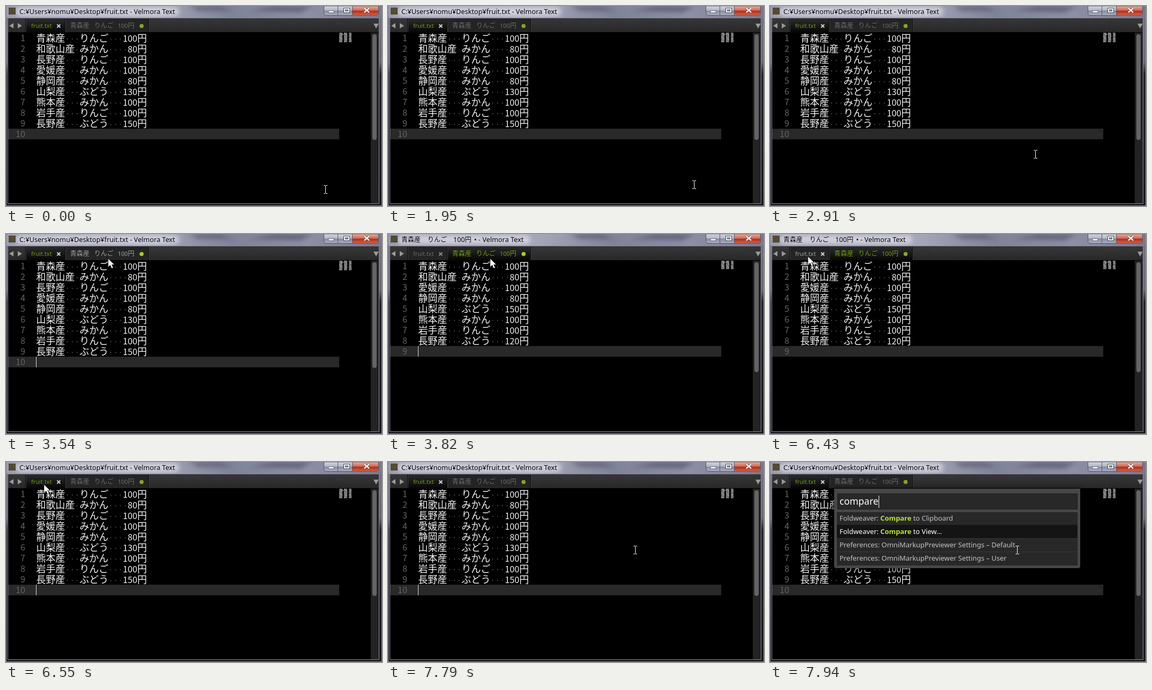
Animation of 703x375 px, one loop 8000 ms. Source, as an HTML page:

```html
<!DOCTYPE html>
<html lang="ja">
<head>
<meta charset="utf-8">
<title>Text editor</title>
<style>
  html, body { margin: 0; width: 100%; height: 100%; overflow: hidden; background: #000; }
  svg { display: block; width: 703px; height: 375px; }
  text { white-space: pre; font-family: "Noto Sans", "Noto Sans CJK JP", sans-serif; }
  .code text { font: 500 16.2px "Noto Sans CJK JP", sans-serif; fill: #f4f4f4; }
  .code .wide { font-size: 18px; }
  .code .space { font: 15px "Noto Sans Mono", monospace; fill: #555; }
  .code .number { font-weight: 400; fill: #646464; text-anchor: end; }
  .title { font-size: 12.7px; fill: #050505; }
  .title .wide { font-size: 12px; }
  .tab { font-size: 11px; fill: #6c6c6c; }
  .tab .wide { font-size: 12px; }
  .tab.hover { fill: #a0a0a0; }
  .tab.active { fill: #6f9f12; }
  .palette text { font-size: 12.9px; fill: #c4c4c4; }
  .palette .query { font-size: 17.5px; fill: #fff; }
  .palette .selected { fill: #fff; }
  .palette .match { font-weight: 700; fill: #b4e438; }
</style>
</head>
<body>
<svg viewBox="0 0 703 375" lang="ja">
  <defs>
    <linearGradient id="glass">
      <stop offset="0" stop-color="#9b9caf"/><stop offset=".4" stop-color="#a5a7b9"/>
      <stop offset=".6" stop-color="#7f849a"/><stop offset=".8" stop-color="#8d90a6"/>
      <stop offset="1" stop-color="#77788f"/>
    </linearGradient>
    <linearGradient id="bar" x2="0" y2="1">
      <stop offset="0" stop-color="#373737"/><stop offset="1" stop-color="#282828"/>
    </linearGradient>
    <linearGradient id="tabOn" x2="0" y2="1">
      <stop offset="0" stop-color="#2b2b2b"/><stop offset="1" stop-color="#050505"/>
    </linearGradient>
    <linearGradient id="button" x2="0" y2="1">
      <stop offset="0" stop-color="#d3d7e1"/><stop offset=".48" stop-color="#b0b5c5"/>
      <stop offset=".5" stop-color="#83889d"/><stop offset="1" stop-color="#adb2c5"/>
    </linearGradient>
    <linearGradient id="close" x2="0" y2="1">
      <stop offset="0" stop-color="#e5aa9d"/><stop offset=".48" stop-color="#cf6a58"/>
      <stop offset=".5" stop-color="#ae2a18"/><stop offset="1" stop-color="#d2654b"/>
    </linearGradient>
    <linearGradient id="side" x2="0" y2="1">
      <stop offset="0" stop-color="#77738a"/><stop offset=".28" stop-color="#6d697c"/>
      <stop offset=".34" stop-color="#25232e"/><stop offset="1" stop-color="#1b1921"/>
    </linearGradient>
    <filter id="soft" x="-30%" y="-100%" width="160%" height="300%"><feGaussianBlur stdDeviation="4"/></filter>
    <clipPath id="titleClip"><path d="M0 0H703V22H0Z"/></clipPath>
  </defs>

  <!-- window frame -->
  <path fill="url(#side)" d="M0 0H703V375H0Z"/>
  <rect x=".5" y=".5" width="702" height="374" fill="none" stroke="#8b8799"/>
  <g clip-path="url(#titleClip)">
    <path fill="url(#glass)" d="M1 0H702V23H1Z"/>
    <g filter="url(#soft)">
      <path fill="#45465c" opacity=".55" d="M340 0H400L425 9H360ZM455 9L500 0H575L550 12Z"/>
      <rect id="glow" x="18" y="2" height="17" rx="8" fill="#e0e0e9" opacity=".75"/>
    </g>
  </g>
  <rect x="3.5" y="22.5" width="694" height="348" fill="#000" stroke="#89839a"/>
  <rect x="5" y="3" width="13" height="13" fill="#544a35"/>

  <g stroke="#565868">
    <path fill="url(#button)" d="M594.5 0V13Q594.5 17.5 599 17.5H647.5V0Z"/>
    <path fill="url(#close)" d="M647.5 0V17.5H692Q696.5 17.5 696.5 13V0Z"/>
    <path d="M620.5 0V17"/>
  </g>
  <path fill="#fff" stroke="#454759" stroke-width=".7" d="M603 9H613V12.5H603Z"/>
  <path fill="none" stroke="#454759" stroke-width="4" d="M633 5.5H641V11H633Z"/>
  <path fill="none" stroke="#fff" stroke-width="2" d="M633 5.5H641V11H633Z"/>
  <path stroke="#5b302a" stroke-width="4" d="M670 4L679 12M679 4L670 12"/>
  <path stroke="#fff" stroke-width="2.4" d="M670 4L679 12M679 4L670 12"/>

  <!-- tab strip -->
  <path fill="url(#bar)" d="M4 23H697V49H4Z"/>
  <path fill="#999" d="M14 32V42L6 37ZM22 32V42L30 37ZM687 33H697L692 42Z"/>
  <path fill="#242424" d="M37 24H266V49H37Z"/>
  <rect id="tabFill" y="24" height="26" fill="url(#tabOn)"/>
  <path stroke="#0a0a0a" d="M36.5 24V49M110.5 24V49M266.5 24V49"/>
  <path stroke="#404040" d="M37.5 24V49M111.5 24V49M267.5 24V49"/>
  <path id="tabClose" stroke-width="2" d="M95.5 34.5L101.5 40.5M101.5 34.5L95.5 40.5"/>
  <circle id="dirty" cx="253.5" cy="37.5" r="3.8"/>
  <text class="tab" x="47" y="41">fruit.txt</text>
  <g class="tab">
    <text class="wide" x="120" y="41">青森産</text><text class="wide" x="165" y="41">りんご</text>
    <text x="209" y="41">100<tspan class="wide">円</tspan></text>
  </g>

  <!-- scrollbar -->
  <path fill="#232323" d="M682 50H697V370H682Z"/>
  <rect id="thumb" x="685" y="53" width="8" rx="4" fill="#646464"/>

  <g class="title">
    <text x="25" y="15">C:¥Users¥nomu¥Desktop¥fruit.txt - Velmora Text</text>
  </g>
  <g class="title">
    <text class="wide" x="25" y="15">青森産</text><text class="wide" x="74" y="15">りんご</text>
    <text x="122" y="15">100<tspan class="wide">円</tspan></text><text x="161" y="15">• - Velmora Text</text>
  </g>

  <g class="code"></g>
  <g class="code"></g>
  <rect id="caret" x="56" width="1" height="20" fill="#ddd"/>

  <g class="palette" id="palette">
    <path fill="#000" opacity=".5" filter="url(#soft)" d="M118 50H582V202H118Z"/>
    <path fill="#474747" d="M120 50H580V195Q580 199 576 199H124Q120 199 120 195Z"/>
    <rect x="126.5" y="59.5" width="448" height="29" fill="#282828" stroke="#1b1b1b"/>
    <text class="query" x="130" y="80">compare</text>
    <path fill="#fff" d="M203 63H204V86H203Z"/>
    <path fill="#282828" d="M125 94H575V194H125Z"/>
    <path fill="#141414" d="M125 118H575V143H125Z"/>
    <path stroke="#393939" d="M125 143.5H575M125 168.5H575"/>
    <text x="130" y="110">Foldweaver: <tspan class="match">Compare</tspan> to Clipboard</text>
    <text class="selected" x="130" y="135">Foldweaver: <tspan class="match">Compare</tspan> to View...</text>
    <text x="130" y="160">Preferences: OmniMarkupPreviewer Settings – Default</text>
    <text x="130" y="185">Preferences: OmniMarkupPreviewer Settings – User</text>
  </g>

  <path id="arrow" fill="#fff" stroke="#222" stroke-width=".8" d="M0 0V16L4 12.5L6.7 18.5L9.5 17.2L6.8 11.4H11.5Z"/>
  <path id="beam" fill="none" stroke="#fff" d="M-3 -7.5H0M1 -7.5H4M.5 -7V7M-3 7.5H0M1 7.5H4"/>
</svg>
<script>
const LOOP = 8000;
const SAMPLE = 137;
const BLINK = 1035;
const PALETTE_OPENS = 7940;
const LINE = 20;
const CELL = 9;

const $ = id => document.getElementById(id);
const all = selector => [...document.querySelectorAll(selector)];

const files = [
  '青森 りんご 100,和歌山 みかん 80,長野 りんご 100,愛媛 みかん 100,静岡 みかん 80,山梨 ぶどう 130,熊本 みかん 100,岩手 りんご 100,長野 ぶどう 150',
  '青森 りんご 100,和歌山 みかん 80,愛媛 みかん 100,静岡 みかん 80,山梨 ぶどう 150,熊本 みかん 100,岩手 りんご 100,長野 ぶどう 120'
].map(file => file.split(',').map(row => row.split(' ')));

// The first view opened before the loop begins, so its caret is mid-blink.
const views = [
  { start: -710, file: 0 },
  { start: 3820, file: 1 },
  { start: 6550, file: 0 }
];

const home = { x: 597, y: 344 };
const moves = [
  { start: 1400, end: 1950, x: 572, y: 335 },
  { start: 2650, end: 3540, x: 191, y: 46 },
  { start: 5890, end: 6430, x: 71, y: 42 },
  { start: 6970, end: 7250, x: 462, y: 165 }
];

function add(parent, tag, attrs, content = '') {
  const node = document.createElementNS('http://www.w3.org/2000/svg', tag);
  for (const name in attrs) node.setAttribute(name, attrs[name]);
  node.textContent = content;
  parent.append(node);
}

function addMinimapRun(group, row, from, to) {
  for (let cell = from; cell < to; cell++) {
    const shade = 80 + (cell * 37 + row * 53) % 85;
    add(group, 'rect', { x: 623 + cell, y: 50 + row * 2, width: 1, height: 2, fill: `rgb(${shade},${shade},${shade})` });
  }
}

function addLine(group, [place, fruit, price], row) {
  const origin = place + '産';
  const line = origin + ' '.repeat(9 - 2 * origin.length) + fruit + price.padStart(6) + '円';
  let cell = 0;
  for (const run of line.match(/ +|\d+|[^ \d]+/g)) {
    const kind = run[0] === ' ' ? 'space' : /\d/.test(run) ? 'digits' : 'wide';
    const next = cell + run.length * (kind === 'wide' ? 2 : 1);
    const x = 56.5 + cell * CELL;
    add(group, 'text', { class: kind, x, y: 66.5 + row * LINE }, run.replace(/ /g, '·'));
    if (kind !== 'space') addMinimapRun(group, row, cell, next);
    cell = next;
  }
}

const editors = all('.code');
files.forEach((rows, i) => {
  const group = editors[i];
  add(group, 'rect', { x: 4, y: 50 + rows.length * LINE, width: 619, height: LINE, fill: '#292929' });
  rows.forEach((row, n) => addLine(group, row, n));
  for (let n = 0; n <= rows.length; n++)
    add(group, 'text', { class: 'number', x: 36, y: 66 + n * LINE }, n + 1);
});

const clamp = v => Math.min(1, Math.max(0, v));
const ease = p => p * p * (3 - 2 * p);

function pointerAt(time) {
  let { x, y } = home;
  for (const move of moves) {
    if (time < move.start) break;
    const steps = Math.round((move.end - move.start) / SAMPLE);
    const step = Math.floor((time - move.start) / (move.end - move.start) * steps);
    const p = ease(clamp((step + 1) / (steps + 1)));
    x += (move.x - x) * p;
    y += (move.y - y) * p;
  }
  return { x: Math.round(x), y: Math.round(y) };
}

// Fully lit after a tab switch, then fading in and out.
function caretAt(time, start) {
  const sincePeak = Math.max(0, time - start - 195);
  return clamp(2.2 * (Math.cos(2 * Math.PI * sincePeak / BLINK) - .35));
}

const show = (node, visible) => node.setAttribute('visibility', visible ? 'visible' : 'hidden');
const set = (id, attrs) => { for (const name in attrs) $(id).setAttribute(name, attrs[name]); };

const titles = all('.title');
const tabs = all('.tab');

function draw() {
  const time = performance.now() % LOOP;
  const { start, file } = views.findLast(view => view.start <= time);
  const { x, y } = pointerAt(time);
  const paletteOpen = time >= PALETTE_OPENS;
  const overTabs = y < 50;
  const hover = overTabs ? (x < 110 ? 0 : 1) : -1;

  for (const i of [0, 1]) {
    show(titles[i], i === file);
    show(editors[i], i === file);
    tabs[i].classList.toggle('active', i === file);
    tabs[i].classList.toggle('hover', i === hover);
  }
  set('glow', { width: file ? 248 : 306 });
  set('tabFill', file ? { x: 111, width: 155 } : { x: 37, width: 73 });
  set('tabClose', { stroke: file && hover ? '#858585' : '#d0d0d0' });
  set('dirty', { fill: hover === 1 ? '#a9c83c' : '#86a52a' });
  set('thumb', { height: file ? 206 : 198 });
  set('caret', { y: 50 + files[file].length * LINE, opacity: paletteOpen ? 0 : caretAt(time, start) });
  show($('palette'), paletteOpen);

  show($('arrow'), overTabs);
  show($('beam'), !overTabs);
  set(overTabs ? 'arrow' : 'beam', { transform: `translate(${x} ${y})` });
  requestAnimationFrame(draw);
}
draw();
</script>
</body>
</html>
```
